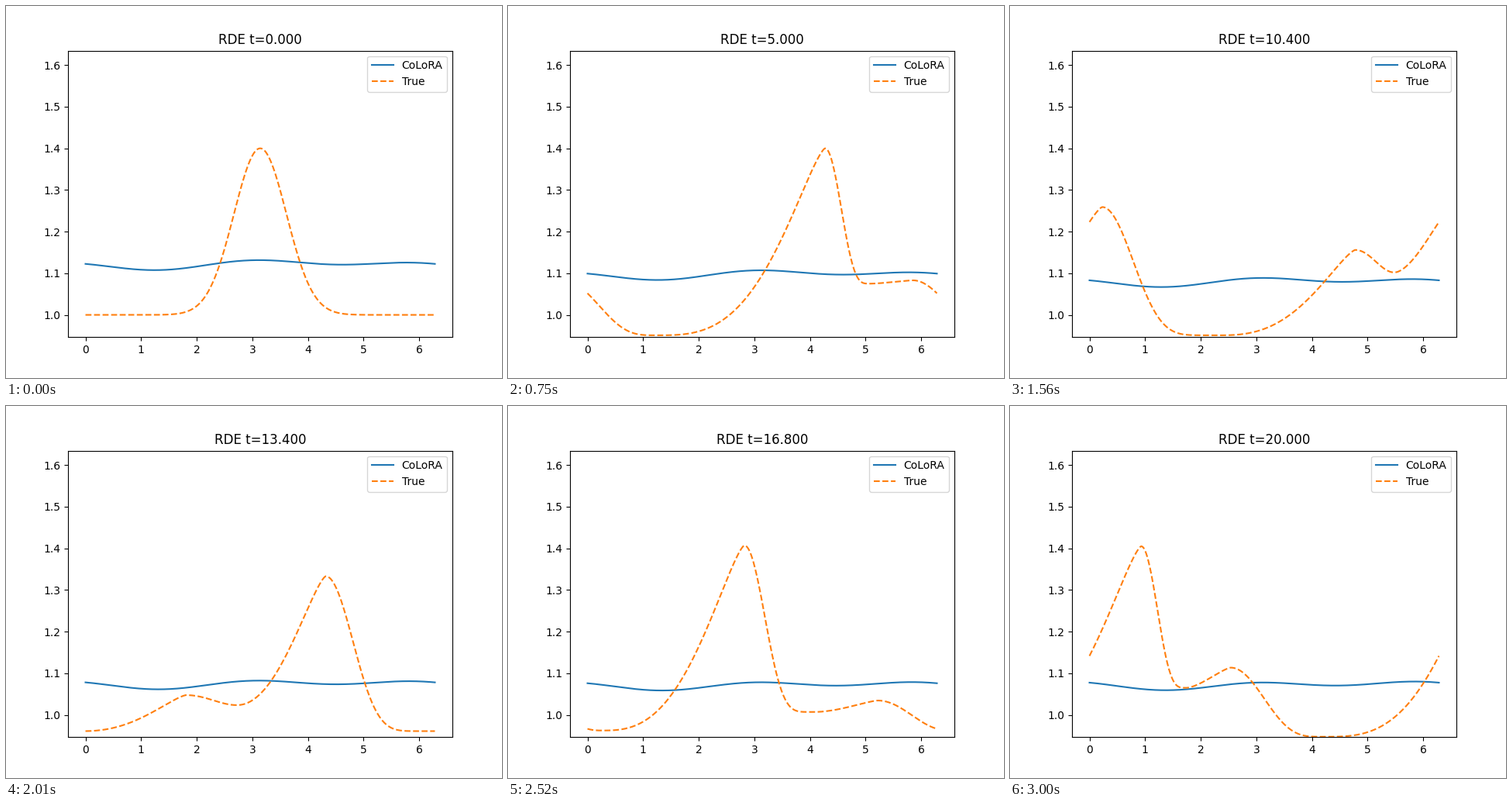
These frames come from a looping animation (640x480 px, 3030 ms). A matplotlib script:

```python
import numpy as np
import matplotlib.pyplot as plt
from matplotlib.animation import FuncAnimation

TAU = 2 * np.pi
FRAMES, DT = 101, 0.2
N = 400
IGNITION = 25              # number of frames in the starting transient
BOTTOM, TOP = 0.9467, 1.6346

grid = np.arange(N) * TAU / N
xs = np.linspace(0, TAU, N + 1)


def spline(x, y, q):
    """Natural cubic spline through the rows of y, evaluated at q."""
    n, h = len(x), np.diff(x)
    slope = (np.diff(y, axis=0).T / h).T
    a, r = np.eye(n), np.zeros_like(y)
    for i in range(1, n - 1):
        a[i, i - 1:i + 2] = h[i - 1], 2 * (h[i - 1] + h[i]), h[i]
        r[i] = 6 * (slope[i] - slope[i - 1])
    m = np.linalg.solve(a, r)
    k = np.clip(np.searchsorted(x, q) - 1, 0, n - 2)
    u = (x[k + 1] - q) / h[k]
    v = 1 - u
    bend = ((u**3 - u) * m[k] + (v**3 - v) * m[k + 1]) * h[k]**2 / 6
    return u * y[k] + v * y[k + 1] + bend


# Two travelling pulses: key points of each crest and of the dip ahead of it.
TIMES = np.array([5, 7.4, 10.4, 13.4, 16.8, 20])
TRACKS = np.array([
    [4.272, 7.373, 11.063, 14.376, 17.786, 21.390],    # lead crest, unwrapped
    [5.850, 8.913, 12.796, 16.886, 21.670, 26.063],    # chasing crest, unwrapped
    [1.400, 1.288, 1.156, 1.0475, 1.0345, 1.1135],     # lead height
    [1.083, 1.147, 1.259, 1.333, 1.407, 1.405],        # chasing height
    [1.075, 1.099, 1.102, 1.0235, 0.9625, 0.9475],     # dip ahead of lead
    [0.951, 0.949, 0.951, 0.961, 1.007, 1.065],        # dip ahead of chaser
]).T


def arc(s, gap, y0, y1, dip):
    """Steep front down from one crest, then a ramp up to the next."""
    fall = gap * (0.435 + 0.25 * (y0 - y1))
    rise = gap - fall
    p = np.clip(s / fall, 0, 1)
    q = np.clip((s - fall) / rise, 0, 1)
    down = (1 - p * p)**(2 + 8.5 * (y0 - dip) * fall)
    up = 1 - (1 - q**(1 + 0.67 * rise))**1.4
    return dip + (y0 - dip) * down + (y1 - dip) * up


def pulses(t, x):
    a, b, ya, yb, dip_a, dip_b = spline(TIMES, TRACKS, t)
    s, gap = (x - a) % TAU, b - a
    return np.where(s < gap,
                    arc(s, gap, ya, yb, dip_a),
                    arc(s - gap, TAU - gap, yb, ya, dip_b))


# Detonation model for the transient: u is the wave, lam the burnt fraction.
NU, EPS, MU = 0.01, 0.11, 2.6
wave = np.fft.rfftfreq(N, 1 / N)


def rate(state):
    u, lam = state
    burn = (1 - lam) * np.exp((u - 1.1) / 0.3)
    refill = MU / (1 + np.exp(5 * (u - 0.5))) * lam
    advect = np.fft.irfft(-1j * wave * np.fft.rfft(u * u / 2), N)
    diffuse = np.fft.irfft(-NU * wave**2 * np.fft.rfft(state), N)
    return np.array([burn - EPS * u * u + advect, burn - refill]) + diffuse


def simulate(count, sub=50):
    h = DT / sub
    s = np.array([1 + 0.4 * np.exp(-2.25 * (grid - np.pi)**2), np.full(N, 0.75)])
    out = [s[0]]
    for _ in range(count):
        for _ in range(sub):
            k1 = rate(s)
            k2 = rate(s + h / 2 * k1)
            k3 = rate(s + h / 2 * k2)
            k4 = rate(s + h * k3)
            s = s + h / 6 * (k1 + 2 * k2 + 2 * k3 + k4)
        out.append(s[0])
    return out


def crest(u):
    k = int(np.argmax(u))
    a, b, c = u[k - 1], u[k], u[(k + 1) % N]
    return (k + 0.5 * (a - c) / (a - 2 * b + c)) * TAU / N


def sample(u, x):
    return np.interp(x, grid, u, period=TAU)


def transient():
    """Simulated start, eased into the travelling pulses."""
    raw = simulate(IGNITION)
    peak = max(u.max() for u in raw)
    runs = []
    for u in raw:
        lift = max(u.max() - 1.4, 0) / (peak - 1.4) * (TOP - peak)
        runs.append(u + lift * np.clip((u - 1.1) / (u.max() - 1.1), 0, 1))
    path = np.unwrap([crest(u) for u in runs], period=TAU)
    lead = TRACKS[0, 0]
    drift = lead + TAU - path[-1]
    rest = pulses(TIMES[0], grid + lead) - sample(runs[-1], grid + path[-1])
    curves = []
    for i, u in enumerate(runs):
        w = i / IGNITION
        shift = w * drift
        curves.append(sample(u, xs - shift) + w * w * sample(rest, xs - path[i] - shift))
    return curves


def ripple(t):
    """The fitted curve: a shallow ripple that sinks and settles."""
    base = 1.076 + 0.0465 * (1 - t / 17)**2
    tilt = 0.0045 * (1 - (t / 20.5)**1.5)
    return (base + tilt * (1 - np.cos(xs)) - 0.0057 * np.sin(xs)
            - 0.006 * (1 - np.cos(2 * xs)) - 0.0031 * np.sin(2 * xs))


true = transient() + [pulses(i * DT, xs) for i in range(IGNITION + 1, FRAMES)]

fig, ax = plt.subplots(figsize=(6.4, 4.8), dpi=100)
fit_line, = ax.plot(xs, ripple(0), label="CoLoRA")
true_line, = ax.plot(xs, true[0], "--", label="True")
ax.set_ylim(BOTTOM, TOP)
ax.legend(loc="upper right")
title = ax.set_title("RDE t=0.000")


def update(i):
    fit_line.set_ydata(ripple(i * DT))
    true_line.set_ydata(true[i])
    title.set_text(f"RDE t={i * DT:.3f}")
    return fit_line, true_line, title


anim = FuncAnimation(fig, update, frames=FRAMES, interval=30, repeat=True, repeat_delay=0)
plt.show()
```
